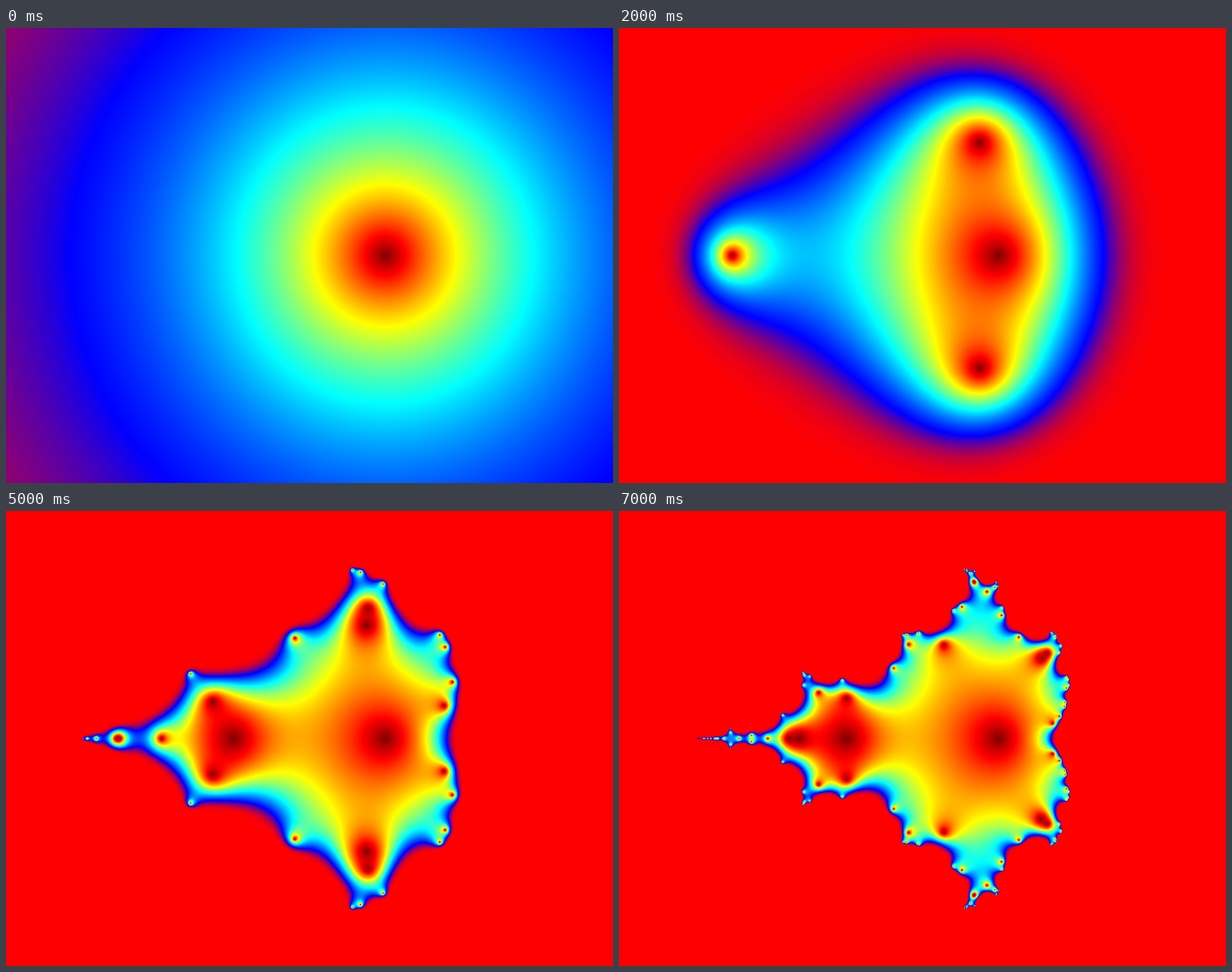
Recreate the animation shown at these times as a matplotlib script. Size 800 px wide and 600 px high, loop 8 s.

```python
import numpy as np
import matplotlib.pyplot as plt
from matplotlib.animation import FuncAnimation
from matplotlib.colors import LinearSegmentedColormap

WIDTH, HEIGHT, DPI = 800, 600, 100
STEPS = 8
STOPS = ["red", "blue", "#007FFF", "cyan", "#7FFF7F",
         "yellow", "#FF7F00", "red", "#7F0000"]


def make_palette(stops, size=256):
    """Byte colours of a linear ramp through evenly spaced stops."""
    ramp = LinearSegmentedColormap.from_list("ramp", stops, N=size)
    return np.round(255 * ramp(np.arange(size))[:, :3]).astype(np.uint8)


def orbit_images(steps):
    """Iterate z -> z^2 + c, colouring exp(-|z|) after every step."""
    palette = make_palette(STOPS)
    re = np.linspace(-2.5, 1.5, WIDTH)
    im = np.linspace(1.5, -1.5, HEIGHT)
    c = re[None, :] + 1j * im[:, None]
    z = np.zeros_like(c)
    images = []
    for _ in range(steps):
        z = z * z + c
        level = np.round(255 * np.exp(-np.abs(z))).astype(int)
        images.append(palette[level])
    return images


images = orbit_images(STEPS)

fig = plt.figure(figsize=(WIDTH / DPI, HEIGHT / DPI), dpi=DPI)
ax = fig.add_axes([0, 0, 1, 1])
ax.axis("off")
picture = ax.imshow(images[0], aspect="auto", interpolation="nearest")


def update(step):
    picture.set_data(images[step])
    return [picture]


anim = FuncAnimation(fig, update, frames=STEPS, interval=1000,
                     repeat=True, repeat_delay=0)
plt.show()
```
